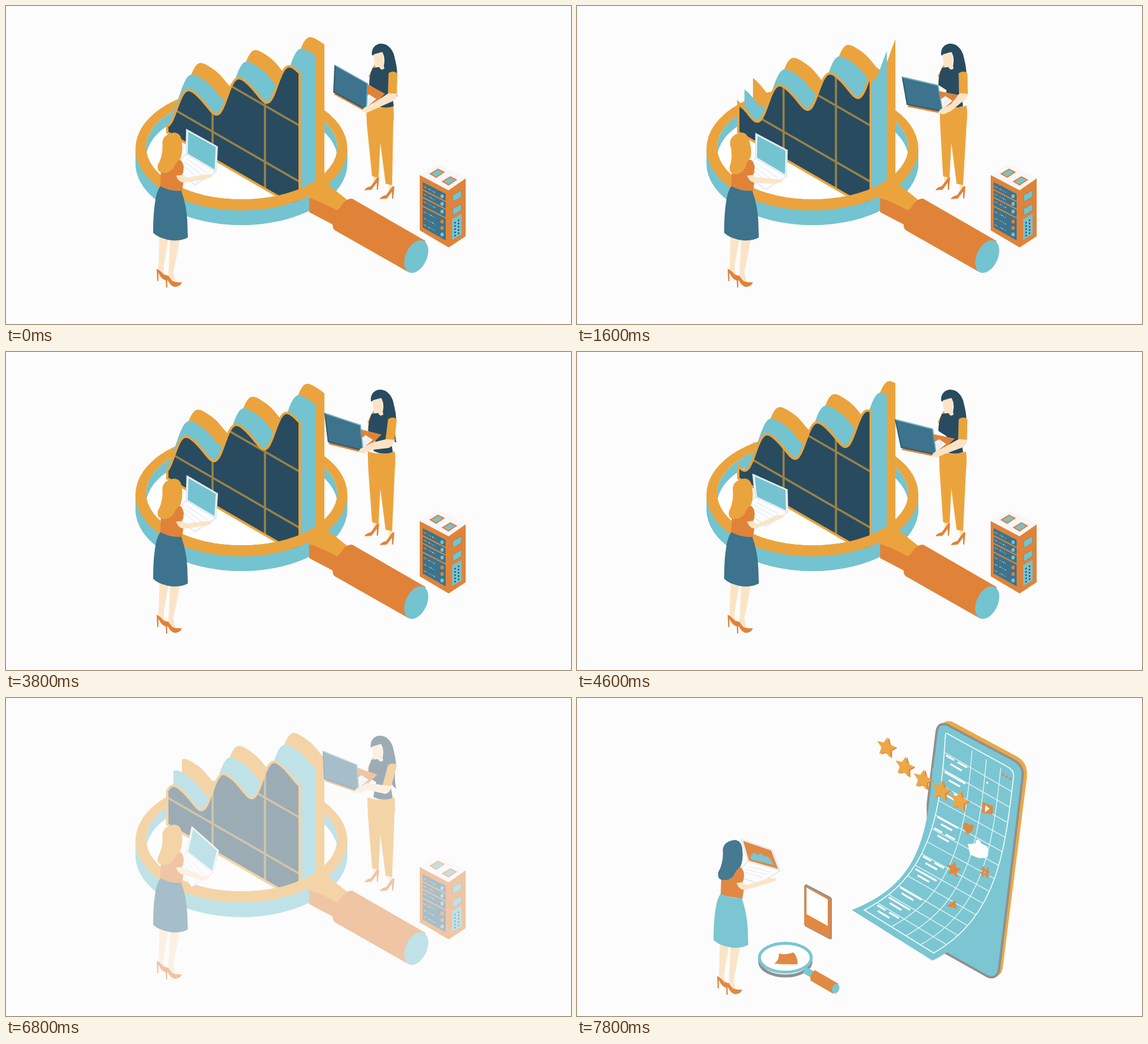
An HTML page that plays this animation: 960x540 px, repeating every 8000 ms.

```html
<!DOCTYPE html>
<html lang="en">
<head>
<meta charset="utf-8">
<title>Data research</title>
<style>
html, body { margin: 0; width: 100%; height: 100%; overflow: hidden; background: #fcfcfc; }
svg { display: block; width: 100%; height: 100%; }
</style>
</head>
<body>
<svg id="stage" viewBox="0 0 960 540"></svg>
<script>
const LOOP = 8000, STEP = 200, WAVE = 4000;
const GOLD = '#eba43d', ORANGE = '#e08339', TEAL = '#74c3d0', NAVY = '#284b5f',
      BLUE = '#3d738c', SKIN = '#fbe4c6', PALE = '#e3e8ef', GREY = '#8b8b8b';

const path = (d, fill, extra = '') => `<path d="${d}" fill="${fill}" ${extra}/>`;
const line = (d, color, width, extra = '') =>
  `<path d="${d}" fill="none" stroke="${color}" stroke-width="${width}" ${extra}/>`;
const poly = (points, fill, extra = '') => `<polygon points="${points.join(' ')}" fill="${fill}" ${extra}/>`;
const ellipse = (x, y, rx, ry, fill, extra = '') =>
  `<ellipse cx="${x}" cy="${y}" rx="${rx}" ry="${ry}" fill="${fill}" ${extra}/>`;
const group = (content, attrs) => `<g ${attrs}>${content}</g>`;
const add = ([x, y], dx, dy) => [x + dx, y + dy];
const mix = (a, b, k) => a.map((v, i) => v + (b[i] - v) * k);
const pairs = flat => [0, 2, 4, 6].map(i => [flat[i], flat[i + 1]]);

// Rows are [time, ...values]; values ease from row to row.
function poseAt(rows, t) {
  const i = rows.findLastIndex(row => row[0] <= t);
  const [from, to] = [rows[i], rows[i + 1] || rows[i]];
  const k = to === from ? 0 : (t - from[0]) / (to[0] - from[0]);
  return mix(from.slice(1), to.slice(1), k * k * (3 - 2 * k));
}

// Screen corners clockwise from the top left, then head angle.
const SITTER = [
  [0, 307, 210, 359, 239, 357, 281, 306, 251, 0],
  [600, 299, 208, 357, 234, 358, 272, 303, 246, -2],
  [1600, 304, 217, 357, 245, 356, 289, 303, 258, -10],
  [2000, 304, 217, 357, 245, 356, 289, 303, 258, -10],
  [2800, 316, 219, 361, 259, 352, 297, 307, 261, 0],
  [4000, 307, 210, 359, 239, 357, 281, 306, 251, 0]
];
// Screen corners, then shift of hips and of head.
const STANDER = [
  [0, 559, 101, 614, 132, 612, 176, 557, 146, 0, 0],
  [1600, 553, 121, 613, 135, 621, 179, 561, 167, 4, -3],
  [2800, 543, 90, 599, 115, 601, 158, 543, 139, 2, 0],
  [4600, 541, 115, 604, 131, 610, 174, 551, 162, 3, -3],
  [6000, 546, 109, 606, 129, 609, 172, 552, 157, 3, -3],
  [6800, 539, 91, 596, 114, 599, 157, 541, 137, 2, -2]
];

function wavePoints(x0, x1, { peak, top, length, height, lean }, t) {
  const points = [];
  for (let x = x0; x <= x1; x++) {
    const a = 2 * Math.PI * ((x - peak) / length - t / WAVE);
    const y = top + height - .236 * (x - peak) - height * Math.cos(a - lean * (1 - Math.cos(a)) / 2);
    points.push([x, y.toFixed(1)]);
  }
  return points;
}

function chart(t) {
  const back = [...wavePoints(299, 541, { peak: 329, top: 97, length: 93, height: 27.5, lean: .88 }, t),
    [541, 300], [525, 300], [400, 256], [299, 198]];
  const front = [...wavePoints(274, 499, { peak: 308.4, top: 143, length: 85.5, height: 26.5, lean: .62 }, t),
    [499, 344.5], [274, 214.5]];
  const grid = 'M351 90V300M440 90V340M274 73.5L499 203.3M274 169L499 298.7';
  return poly(back, GOLD)
    + poly(back, TEAL, 'transform="translate(-14.5 19.5)"')
    + `<clipPath id="panel">${poly(front, '#000')}</clipPath>`
    + poly(front, NAVY)
    + line(grid, '#9a8248', 3.6, 'clip-path="url(#panel)"')
    + poly(front, 'none', `stroke="${GOLD}" stroke-width="4"`);
}

const RING = path('M220 242A180 105 0 0 1 580 242A180 105 0 0 1 220 242Z'
  + 'M238 240A162.5 88.5 0 0 1 563 240A162.5 88.5 0 0 1 238 240Z', GOLD, 'fill-rule="evenodd"');
const ringBack = `<clipPath id="hole">${ellipse(400.5, 240, 162.5, 88.5, '#000')}</clipPath>`
  + path('M220 242V267A180 105 0 0 0 580 267V242Z', TEAL)
  + group(ellipse(400.5, 240, 164, 90, TEAL) + ellipse(400.5, 259, 162.5, 88.5, '#fff'), 'clip-path="url(#hole)"')
  + RING;
const ringFront = '<clipPath id="near"><rect x="200" y="242" width="400" height="140"/></clipPath>'
  + path('M220 242A180 105 0 0 0 580 242V267A180 105 0 0 1 220 267Z', TEAL)
  + group(RING, 'clip-path="url(#near)"');
const handle = path('M515 325L570 340L557 372L515 350Z', ORANGE)
  + path('M515 312L541 298L582 331L562 347Q540 334 515 326Z', GOLD)
  + path('M588 327L713 399L684 452L559 381Q553 377 556 365L569 340Q577 327 588 327Z', ORANGE)
  + ellipse(697, 425.5, 18, 29.5, TEAL, 'transform="rotate(25 697 425.5)"');

function server(t) {
  const rows = [300, 313, 326, 343, 354, 365].map((y, i) => {
    const lights = [0, 1, 2, 3].map(j => {
      const lit = (t / STEP + i * 3 + j * 5) % 7 < 2;
      return ellipse(719 + j * 3, y + 11 + j * 1.7, .8, .9, lit ? '#fff' : TEAL);
    }).join('');
    const dot = i === 3 || i === 4;
    return line(`M709.5 ${y + 6}l5 3`, ORANGE, 2) + lights
      + ellipse(741, y + 23, 2.8, 3.3, dot ? ORANGE : TEAL);
  }).join('');
  let ports = '';
  for (let i = 0; i < 10; i++)
    ports += ellipse(763 + i % 2 * 6, 368 - i % 2 * 4 + (i >> 1) * 5.5, 1.3, 1.4, NAVY);
  const window = y => path(`M759 ${y}l15 -8v11l-15 9Z`, TEAL, 'stroke="#a08058"');
  const lid = (x, y) => path(`M${x} ${y}l15 -9l12 6l-15 10Z`, ORANGE) + path(`M${x + 4} ${y}l11 -6.5l8 4l-11 7Z`, TEAL);
  return path('M703 287L752 312L781 292V391L752 410L703 381Z', ORANGE)
    + path('M734 269L782 292L752 313L703 287Z', '#f6f6fb')
    + lid(719, 285) + lid(740, 298)
    + path('M708 299L747 319V398L708 376Z', BLUE)
    + line('M708 312l39 20M708 325l39 20M708 340l39 20', ORANGE, 2)
    + rows + window(321) + window(344)
    + path('M758 362L774 353V388L758 397Z', TEAL) + ports;
}

function sitter(flat, angle, { hair, skirt, screen, hills, reach = 9 }) {
  const [tl, tr, br, bl] = pairs(flat);
  const hand = add(br, -9, reach), near = add(br, -36, 23), side = add(bl, -20, 24);
  const shoe = 'M271 457Q277 460 283 467Q290 470 299 469Q296 477 286 477Q279 475 274 464L274 478L272 478Z';
  const keys = [.25, .45, .65].map(k =>
    line(`M${add(mix(bl, side, k), 6, 3)}L${add(mix(br, near, k), -6, -3)}`, PALE, 1.6, 'stroke-dasharray="3 1"')).join('');
  const inner = [mix(tl, br, .05), mix(tr, bl, .05), mix(br, tl, .05), mix(bl, tr, .05)];
  const locks = 'M286 215Q298 216 299 232Q301 248 296 260Q288 266 284 276Q276 285 264 283Q256 281 258 270Q266 256 266 238Q263 218 286 215Z';
  return path('M261 385L277 390L268 440L268 452L274 460L268 462Q261 456 259 448Z', SKIN)
    + path(shoe, ORANGE, 'transform="translate(-15 -11)"')
    + path('M279 392L296 392L288 435L284 452L288 468Q280 466 276 458Z', SKIN)
    + path(shoe, ORANGE)
    + poly([bl, br, near, side], '#fdfdff', `stroke="${PALE}" stroke-width="2"`) + keys
    + poly([tl, tr, br, bl], '#f1f4f9', `stroke="${PALE}" stroke-width="2"`)
    + poly(inner, screen)
    + (hills ? path(hills, TEAL) : '')
    + path('M263 282L290 262Q300 260 302 274L299 288L302 296L299 315L262 309Z', ORANGE)
    + path(`M289 288L299 287Q302 292 309 291L${add(hand, -10, -4)}L${add(hand, 2, -4)}L${add(hand, 2, 0)}`
      + `L${add(hand, -9, 4)}L303 300Q293 300 289 288Z`, SKIN)
    + path('M281 268Q286 258 297 262Q303 268 301 284L287 288Q279 278 281 268Z', ORANGE)
    + path('M262 306Q280 315 298 314Q307 340 308 365L309 393Q300 399 282 398Q260 395 250 385Q250 355 253 335Q255 317 262 306Z', skirt)
    + path(locks, hair, `transform="rotate(${angle} 280 265)"`);
}

function stander(pose) {
  const [tl, tr, br, bl] = pairs(pose), hip = pose[8], head = pose[9];
  const lift = Math.min(0, (br[0] - 612) * .7);
  const shoe = 'M630 292L634 291L632 312L630 312L630 300L621 312L609 313Q611 308 620 306Z';
  const foot = 'M624 287L632 289L629 300L620 308L624 299Z';
  const feet = path(foot, SKIN) + path(shoe, ORANGE);
  const x = v => v + hip;
  const elbow = [658 + lift, 150];
  return feet + group(feet, 'transform="translate(26 15)"')
    + path(`M${x(612)} 169Q${x(637)} 176 ${x(658)} 169Q${x(660)} 185 ${x(658)} 200L656 304L645 302L636 232L633 292L622 289L${x(613)} 200Z`, GOLD)
    + group(
      path('M624 103L627 99L629 112L618 122L616 119Z', GOLD)
      + path('M623 105L638 103L655 111L662 118L654 140L659 170Q642 176 626 168L631 143L617 134Q617 118 623 105Z', NAVY)
      + path('M622 84C620 71 629 63 639 64C650 65 656 74 659 82C662 95 666 108 664 120Q661 135 665 154Q655 148 657 138Q650 116 640 107Q646 92 640 79Z', NAVY)
      + path('M625 82L639 78Q643 90 641 98L643 106Q637 111 634 103Q625 101 625 92Z', SKIN),
      `transform="translate(${head} 0)"`)
    + poly([add(bl, 0, 4), add(br, 0, 4), add(br, 32, -27), add(bl, 32, -27)], ORANGE)
    + poly([add(br, 0, -4), add(br, 17, -18), add(br, 5, -26), add(br, -4, -20)], '#f6f4f6')
    + line(`M${add(br, 1, -9)}l10 -9m-9 4l8 -7`, '#c8ccd4', 1, 'stroke-dasharray="2 1"')
    + poly([tl, tr, br, bl], BLUE, 'stroke="#2d5a70" stroke-width="2" stroke-linejoin="round"')
    + line(`M${tl}L${tr}L${br}`, TEAL, 1.3)
    + path(`M${add(elbow, -8, -2)}L${add(elbow, 7, -2)}Q${add(elbow, 5, 10)} ${add(elbow, -4, 13)}L${add(br, 15, -1)}`
      + `L${add(br, 2, 5)}L${add(br, -8, 3)}L${add(br, -4, -3)}L${add(br, 15, -13)}Z`, SKIN)
    + path(`M${650 + head / 2} 114Q658 108 ${665 + head / 2} 115L${add(elbow, 6, -1)}L${add(elbow, -9, -2)}Z`, GOLD);
}

function analysis(t) {
  const left = poseAt(SITTER, t % WAVE);
  return ringBack + chart(t) + ringFront + handle
    + sitter(left, left[8], { hair: GOLD, skirt: BLUE, screen: TEAL })
    + stander(poseAt(STANDER, t)) + server(t);
}

function star(x, y, r, fill) {
  const points = Array.from({ length: 10 }, (_, i) => {
    const a = (i * 36 - 82) * Math.PI / 180, k = i % 2 ? r * .48 : r;
    return [x + k * Math.cos(a), y + k * 1.1 * Math.sin(a) + k * .2 * Math.cos(a)];
  });
  return poly(points, fill);
}

const bezier = (p, v) => [0, 1].map(i => {
  const u = 1 - v;
  return u * u * u * p[0][i] + 3 * u * u * v * p[1][i] + 3 * u * v * v * p[2][i] + v * v * v * p[3][i];
});
const LEFT_EDGE = [[626, 62], [618, 205], [597, 305], [488, 360]];
const RIGHT_EDGE = [[742, 132], [727, 260], [715, 370], [606, 433]];
const onSheet = (u, v) => mix(bezier(LEFT_EDGE, v), bezier(RIGHT_EDGE, v), u);

function sheet() {
  let grid = '', text = '';
  for (const u of [.39, .6, .81]) grid += `M${LEFT_EDGE.map((p, i) => mix(p, RIGHT_EDGE[i], u)).map((p, i) => (i === 1 ? 'C' : '') + p).join(' ')}`;
  for (let v = 1; v < 14; v++) grid += `M${onSheet(0, v / 14)}L${onSheet(1, v / 14)}`;
  for (const v of [.08, .15, .22, .36, .42, .58, .66, .79, .87, .94]) {
    const cut = v % .04 < .02;
    text += `M${onSheet(.03, v)}L${onSheet(cut ? .15 : .34, v)}`
      + (cut ? `M${onSheet(.2, v)}L${onSheet(.34, v)}` : '')
      + `M${onSheet(.1, v + .025)}L${onSheet(.27, v + .025)}`;
  }
  return path('M604 120C596 255 568 320 467 360L604 446Q650 425 685 365L722 200L640 80Z', TEAL)
    + line(`M626 62Q627 58 632 62L730 116Q742 122 742 132C${RIGHT_EDGE.slice(1).join(' ')}L488 360C${[...LEFT_EDGE].reverse().slice(1).join(' ')}`, '#f2fbfc', 1.7)
    + line(grid, '#e2f4f6', 1.4) + line(text, '#fff', 3.2);
}

function reviews() {
  const phone = 'M611 58Q613 41 628 45L741 105Q760 115 757 135L717 461Q714 478 698 473L600 418L596 180Z';
  const stars = [[526, 84], [557, 117], [588, 139], [619, 157], [650, 175]]
    .map(([x, y]) => star(x + 2, y + 1, 16.5, ORANGE) + star(x - 1, y, 16.5, GOLD)).join('');
  const icons = path('M689 176L707 184L706 198L688 195Z', ORANGE) + path('M694 182L701 188L693 194Z', '#fff')
    + path('M664 232Q654 220 657 213Q662 209 666 216Q673 212 674 219Q674 225 664 232Z', ORANGE)
    + path('M664 248L677 247L678 241Q684 238 687 247L697 252Q701 261 697 271L683 272L668 266Z', '#fff')
    + star(640, 291, 13, ORANGE)
    + line('M691 286l-2 17M698 288l-2 17M687 290l14 6M686 296l14 6', ORANGE, 3)
    + path('M628 353L643 343L645 358Z', ORANGE)
    + [724, 730, 736].map((x, i) => ellipse(x, 130 + i * 3.5, 2, 2.2, ORANGE)).join('')
    + ellipse(697, 144, 1.6, 2, '#fff');
  const tablet = path('M389 316L431 338Q433 339 433 342V409L430 410L388 388Q386 386 386 383V319Z', GREY)
    + path('M387 318L429 340Q431 341 431 344V409L388 387Q386 386 386 383Z', ORANGE)
    + path('M390 322L426 342V387L390 367Z', '#fff');
  const lens = ellipse(354, 448, 43.5, 24, 'none', `stroke="${GREY}" stroke-width="5"`)
    + ellipse(354, 441, 42, 23, '#fff')
    + path('M335 451Q344 445 343 434Q354 437 368 432Q375 440 375 452Q355 453 335 451Z', ORANGE)
    + ellipse(354, 441, 44, 24.5, 'none', `stroke="${TEAL}" stroke-width="5"`)
    + path('M389 456L405 466L398 475L384 467Z', TEAL)
    + path('M404 462L444 485L435 502L397 480Q394 472 404 462Z', ORANGE)
    + ellipse(439.5, 493.5, 6, 8.5, TEAL, 'transform="rotate(22 439.5 493.5)"');
  const woman = sitter([297, 214, 350, 232, 363, 267, 308, 251], 0, {
    hair: BLUE, skirt: TEAL, screen: ORANGE, reach: 17,
    hills: 'M314 248L313 242Q320 232 325 242Q331 233 337 244Q342 240 346 248L354 258Z'
  });
  return path('M617 55Q620 36 637 40L747 99Q768 110 764 138L723 460Q721 470 712 473L640 420Z', GOLD)
    + path(phone, TEAL, `stroke="${GREY}" stroke-width="4"`)
    + sheet() + icons + stars + tablet + lens
    + group(woman, 'transform="translate(-18 26)"');
}

const reviewScene = reviews();
const FADE = [[0, 1], [6400, 1], [6800, .45], [7100, 0], [7200, 0], [7800, .95], [8000, 1]];
function fadeAt(t) {
  const i = FADE.findLastIndex(([time]) => time <= t);
  const [[t0, a], [t1, b]] = [FADE[i], FADE[i + 1]];
  return a + (b - a) * (t - t0) / (t1 - t0);
}

const stage = document.getElementById('stage');
const start = performance.now();
let shown = -1;
function draw(now) {
  const t = Math.floor(Math.max(0, now - start) % LOOP / STEP) * STEP;
  if (t !== shown) {
    shown = t;
    stage.innerHTML = group(t < 7200 ? analysis(t) : reviewScene, `opacity="${fadeAt(t)}"`);
  }
  requestAnimationFrame(draw);
}
draw(start);
</script>
</body>
</html>
```
